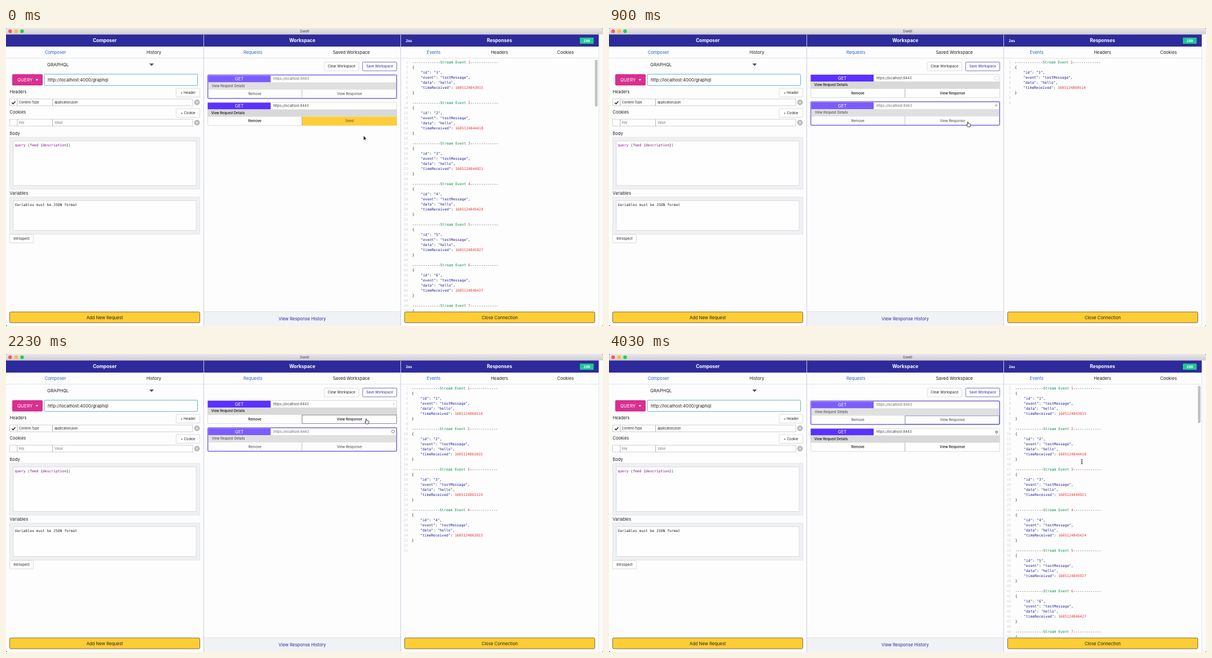
Write an HTML page that moves like this. It is 1058x529 px and loops after 4060 ms.

```html
<!DOCTYPE html>
<html lang="en">
<head>
<meta charset="utf-8">
<title>Swell</title>
<style>
  html, body { margin: 0; width: 100%; height: 100%; overflow: hidden; background: #222; }
  svg { display: block; width: 100vw; height: 100vh; border-radius: 3px; }
  text { white-space: pre; font-family: Inter, Roboto, sans-serif; }
  .mono { font-family: "DejaVu Sans Mono", "Liberation Mono", monospace; }
</style>
</head>
<body>
<svg viewBox="0 0 1058 529" xmlns="http://www.w3.org/2000/svg">
  <defs>
    <linearGradient id="bar" x2="0" y2="1"><stop stop-color="#e9e7e9"/><stop offset="1" stop-color="#d0ced0"/></linearGradient>
    <clipPath id="log"><rect x="700" y="55" width="344" height="448"/></clipPath>
  </defs>
  <g id="frame"></g>
  <g id="cards"></g>
  <g id="response"></g>
  <rect id="thumb" x="1043.7" y="56.5" width="4.6" rx="2.3" fill="#c1c1c1"/>
  <circle class="ring" fill="none" stroke="#444"/>
  <circle class="ring" fill="none" stroke="#444"/>
  <g id="cursor" stroke-linejoin="round">
    <path id="arrow" d="M0 0V8.2L1.9 6.5L3.1 9.2L4.4 8.6L3.2 6H5.7Z" fill="#111" stroke="#fff" stroke-width=".6"/>
    <path id="hand" d="M-.8 .6Q0-.5 .8 .6V3.3L1.6 3Q2.2 3 2.4 3.6Q3.3 3.2 3.6 4Q4.6 3.8 4.6 4.8V6.5L3.8 9H-.4L-2.7 5.6Q-2.6 4.5-.8 5.8Z" fill="#fff" stroke="#111" stroke-width=".8"/>
    <path id="beam" d="M-1.7-4Q0-4 0-3V3Q0 4-1.7 4M1.7-4Q0-4 0-3M0 3Q0 4 1.7 4M-1 .8H1" fill="none" stroke="#222" stroke-width=".9"/>
  </g>
</svg>
<script>
const LOOP = 4060, SELECT = 470, SENT = 700, BACK = 3300, STREAM_GAP = 504;
const NAVY = '#2d2b9b', PURPLE = '#5a31ff', YELLOW = '#ffcd35', LINE = '#d2d2d2';
const $ = id => document.getElementById(id);

// y is the vertical middle of the text
const text = (x, y, s, size, { fill = '#222', anchor = 'start', weight = 400, cls = '' } = {}) =>
  `<text x="${x}" y="${y + size * .36}" font-size="${size}" fill="${fill}" text-anchor="${anchor}" font-weight="${weight}" class="${cls}">${s}</text>`;
const mid = (x, y, s, size, opts) => text(x, y, s, size, { anchor: 'middle', ...opts });
const mono = (x, y, s, opts) => text(x, y, s, 6.33, { cls: 'mono', ...opts });
const span = (fill, s) => `<tspan fill="${fill}">${s}</tspan>`;
const rect = (x, y, x2, y2, fill, stroke = 'none', rx = 0, width = 1) =>
  `<rect x="${x}" y="${y}" width="${x2 - x}" height="${y2 - y}" fill="${fill}" stroke="${stroke}" rx="${rx}" stroke-width="${width}"/>`;
const path = (d, fill, stroke = 'none', width = 1) =>
  `<path d="${d}" fill="${fill}" stroke="${stroke}" stroke-width="${width}"/>`;
const button = (x, y, x2, y2, label, stroke = LINE, fill = '#222') =>
  rect(x, y, x2, y2, '#fefefe', stroke, 1.5, .8) + mid((x + x2) / 2, (y + y2) / 2, label, 6, { fill });
const action = (x, x2, label) =>
  rect(x, 504, x2, 523.2, YELLOW, '#55503c', 2, .8) + mid((x + x2) / 2, 514, label, 7.65);

function fieldRow(y, key, value, checked) {
  const fill = checked ? '#222' : '#777';
  return rect(6.5, y - 6, 331, y + 6, '#fefefe', '#c4c4c4', 0, .8) +
    path(`M20 ${y - 6}v12M82.5 ${y - 6}v12`, 'none', '#a4a4a4', .8) +
    (checked ? path(`M10.5 ${y + .5}l2 2.3l4-4.6`, 'none', '#111', 1.3) : '') +
    text(23, y, key, 5.5, { fill }) + text(86, y, value, 5.5, { fill }) +
    `<circle cx="338.5" cy="${y}" r="5" fill="#bbb"/>` +
    path(`M336.6 ${y - 1.9}l3.8 3.8m0-3.8l-3.8 3.8`, 'none', '#fff', .9);
}

function editor(y, y2) {
  return rect(6.5, y, 343.5, y2, '#eff0f2', '#dfe0e5', 0, .8) +
    rect(13, y + 6.5, 337, y2 - 6.5, '#fefefe', '#d2d5d9', 0, .8);
}

function drawFrame() {
  const white = { fill: '#fff', weight: 700 }, blue = { fill: '#2767c4' };
  const tabs = [['Composer', 87.5], ['History', 262], ['Requests', 437.5], ['Saved Workspace', 612],
    ['Events', 758], ['Headers', 874.5], ['Cookies', 991.5]];
  const heads = [['Composer', 175], ['Workspace', 525], ['Responses', 874.5]];
  const lights = ['#fc5753', '#fdbc40', '#33c748'];
  $('frame').innerHTML = rect(0, 0, 1058, 529, '#fdfdfd') + rect(0, 0, 1058, 11.5, 'url(#bar)') +
    lights.map((c, i) => `<circle cx="${7.3 + 10.6 * i}" cy="5.8" r="3.2" fill="${c}"/>`).join('') +
    mid(529, 6, 'Swell', 6.6, { fill: '#444' }) +
    rect(1050, 11.5, 1058, 529, '#fafafa') + path('M1050.5 33V529', 'none', '#e6e6e6') +
    rect(0, 11.5, 1050.5, 33, NAVY) +
    heads.map(([s, x]) => mid(x, 22, s, 8.3, white)).join('') +
    tabs.map(([s, x], i) => mid(x, 43.7, s, 7.7, [0, 2, 4].includes(i) ? blue : {})).join('') +
    path('M0 53.5H1050', 'none', '#e0e2ea') +
    path('M350.5 12V529M699.5 12V529', 'none', '#c9cde0') +
    text(73, 65, 'GRAPHQL', 8) + path('M254 63h8l-4 4.6z', '#555') +
    rect(11, 82, 65, 102, '#d92f91', 'none', 2) + text(20, 92.2, 'QUERY', 8, { fill: '#fff' }) +
    path('M52.2 90.7h5.2l-2.6 2.8z', '#fff') +
    rect(68, 82, 339.5, 102, '#fefefe', '#4fa6c4', 1.5, .9) +
    text(74, 92.2, 'http://localhost:4000/graphql', 7.7) +
    text(6.5, 113.7, 'Headers', 7.5) + button(301.5, 107, 343.5, 122.5, '+ Header') +
    fieldRow(132, 'Content-Type', 'application/json', true) +
    text(6.5, 149.7, 'Cookies', 7.5) + button(301.5, 143, 343.5, 158.5, '+ Cookie') +
    fieldRow(168, 'Key', 'Value', false) +
    text(6.5, 187.7, 'Body', 7.5) + editor(194, 286) +
    mono(15.5, 208, span('#92108c', 'query ') + span('#0b8a20', '{') + span('#7d0f7d', 'feed ') +
      '{' + span('#7d0f7d', 'description') + '}' + span('#0b8a20', '}')) +
    text(6.5, 293.7, 'Variables', 7.5) + editor(300, 366) +
    mono(15.5, 313.7, 'Variables must be JSON format') +
    button(6.5, 366.5, 48.5, 381.5, 'Introspect') + action(6.5, 343.5, 'Add New Request') +
    button(564, 60.5, 625.5, 76, 'Clear Workspace') +
    button(632, 60.5, 692.5, 76, 'Save Workspace', '#5452ad', NAVY) +
    rect(351, 503.5, 699, 529, '#f1f2f6') + path('M351 503.5H699', 'none', '#dedee4', .8) +
    mid(525, 516.7, 'View Response History', 7.7, { fill: NAVY });
}

function card(y, selected, label, focus) {
  const d = selected ? 1 : 0, top = y + d, x = 357.5 + d, x2 = 692.5 - d;
  const height = selected ? 42.5 : 41, bottom = y + height - d;
  const dark = { fill: '#111', weight: selected ? 400 : 500 };
  return `<g opacity="${selected ? .79 : 1}">` +
    rect(x, top, x2, bottom, '#fefefe', LINE, 1.5, .8) +
    rect(x, top + .5, 469, top + 12.5, PURPLE) +
    mid(413.5, top + 6.6, 'GET', 7.7, { fill: '#fff' }) +
    text(473.5 + d * .5, top + 6.3, 'https://localhost:8443', 6, { fill: '#444' }) +
    rect(x, top + 12.5, x2, top + 25.5, '#d9d9d9') +
    text(363.8 + d, top + 18.8, 'View Request Details', 5.9, dark) +
    (label === 'Send' ? rect(524.5, top + 25.5, x2, bottom, YELLOW) : '') +
    path(`M524.5 ${top + 25.5}V${bottom}`, 'none', '#aaa', .9) +
    mid(441, top + 33, 'Remove', 6.1, dark) +
    mid(608.7, top + 33, label, 6.1, label === 'Send' ? { fill: '#544a22' } : dark) +
    (focus ? rect(524.8, top + 25.8, x2 - .3, bottom - .2, 'none', focus, 0, .8) : '') + '</g>' +
    (selected ? rect(357.6, y + .4, 692.4, y + height - .4, 'none', '#6c52e2', 1.5, 1.2) : '');
}

function events(x, count, base, gap, shortFrom, lines) {
  const key = s => span('#1c1c9c', `"${s}"`) + ': ';
  let out = '';
  for (let i = 0; i < lines; i++)
    out += mono(712.3, 61.2 + 9 * i, i + 1, { fill: '#d2d2d2', anchor: 'end' });
  for (let k = 0; k < count; k++) {
    const stamp = base + gap * k - (k >= shortFrom ? 3 : 0), dashes = '-'.repeat(13);
    const rows = [
      dashes + span('#0b8f4d', 'Stream Event ') + span('#e8352e', k + 1) + dashes, '{',
      key('id') + span('#1c1c9c', `"${k + 1}"`) + ',',
      key('event') + span('#1c1c9c', '"testMessage"') + ',',
      key('data') + span('#1c1c9c', '"hello"') + ',',
      key('timeReceived') + span('#e8352e', stamp), '}'];
    rows.forEach((row, i) => {
      out += mono(x + (i > 1 && i < 6 ? 15.24 : 0), 61.2 + 72 * k + 9 * i, row);
    });
  }
  return `<g clip-path="url(#log)">${out}</g>`;
}

function sceneAt(t) {
  const phase = t < SELECT ? 'start' : t < SENT ? 'empty' : t < BACK ? 'live' : 'back';
  return {
    phase,
    count: phase === 'live' ? 1 + Math.floor((t - SENT) / STREAM_GAP) : 0,
    hover: t > 2080 && t < BACK
  };
}

function drawScene({ phase, count, hover }) {
  const first = phase === 'start' || phase === 'back';
  const label = phase === 'start' || phase === 'empty' ? 'Send' : 'View Response';
  const focus = phase === 'back' ? '#4068ab' : hover ? '#777' : '';
  $('cards').innerHTML = card(first ? 83 : 82.5, first, 'View Response', focus) +
    card(first ? 132 : 130.5, !first, label, phase === 'empty' ? '#86794a' : '');
  $('thumb').style.display = first ? '' : 'none';
  if (phase === 'empty') {
    $('response').innerHTML = '<circle cx="875" cy="244" r="42" fill="#d3dfe6"/>';
    return;
  }
  const bold = { fill: '#fff', weight: 700 };
  $('response').innerHTML =
    (first ? events(720, 7, 1605124843915, 503, 5, 50)
           : events(719, count, 1605124860514, 504, 1, count * 8 + 1)) +
    mono(708.5, 22.3, '2ms', bold) + rect(1017, 17, 1041.5, 28, '#20c596', 'none', 1) +
    mono(1029.3, 22.5, '200', { ...bold, anchor: 'middle' }) + action(706.5, 1043.5, 'Close Connection');
}

const route = [[50, 633.5, 191], [350, 636, 166.5], [1750, 636, 166.5], [2150, 638.5, 115],
  [3550, 638.5, 115], [4000, 838, 191]];

function moveCursor(t) {
  let i = route.findIndex(p => p[0] > t);
  if (i < 0) i = route.length - 1;
  const a = route[Math.max(i - 1, 0)], b = route[i];
  const u = Math.min(1, Math.max(0, (t - a[0]) / (b[0] - a[0] || 1))), e = u * u * (3 - 2 * u);
  const x = a[1] + (b[1] - a[1]) * e, y = a[2] + (b[2] - a[2]) * e;
  const onButton = x < 693 && ((y > 108 && y < 124) || (y > 157 && y < 174));
  const kind = x > 700 ? 'beam' : onButton ? 'hand' : 'arrow';
  $('cursor').setAttribute('transform', `translate(${x} ${y})`);
  for (const id of ['arrow', 'hand', 'beam']) $(id).style.display = id === kind ? '' : 'none';
}

const rings = document.querySelectorAll('.ring');
function pulse(ring, p, x, y, strength) {
  ring.setAttribute('cx', x);
  ring.setAttribute('cy', y);
  ring.setAttribute('r', 4.2 * p);
  ring.setAttribute('opacity', strength * Math.sin(Math.PI * p) ** 2);
}

let drawn = '';
function render(now) {
  const t = now % LOOP, scene = sceneAt(t), key = JSON.stringify(scene);
  if (key !== drawn) drawScene(scene);
  drawn = key;
  const first = scene.phase === 'start' || scene.phase === 'back';
  $('thumb').setAttribute('height', 83 - 2.4 * Math.floor(t / STREAM_GAP));
  pulse(rings[0], (t / 1000 + .95) % 1, first ? 686 : 687, first ? 90 : 89, first ? .79 : 1);
  pulse(rings[1], (t / 1000 + .4) % 1, first ? 687 : 686, first ? 138.5 : 137.5,
    t < SENT ? 0 : first ? 1 : .79);
  moveCursor(t);
}

drawFrame();
const begin = performance.now();
(function tick() {
  render(performance.now() - begin);
  requestAnimationFrame(tick);
})();
</script>
</body>
</html>
```
